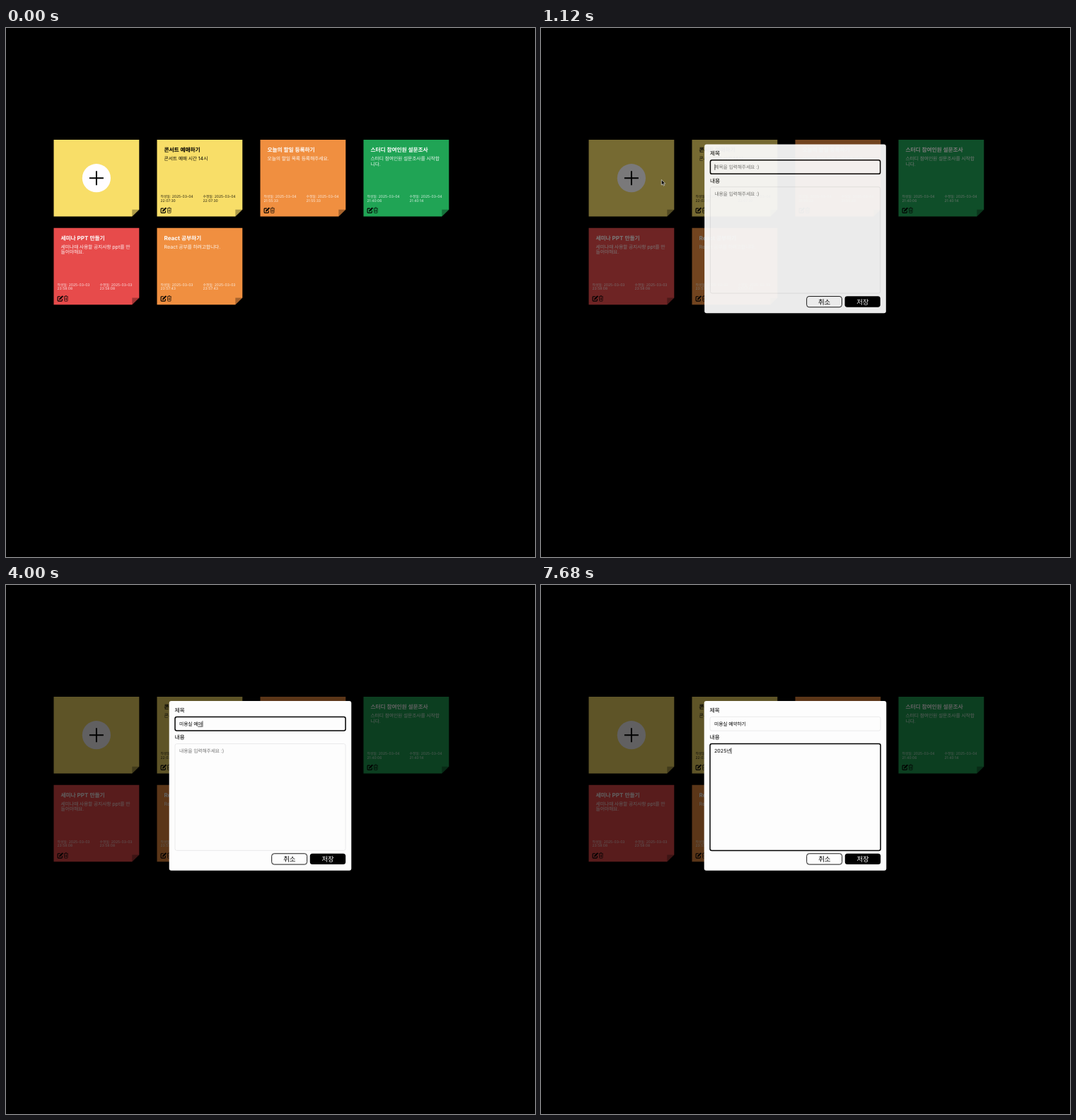
An HTML page for the animation above (8 s loop, 748 by 748 pixels).

```html
<!DOCTYPE html>
<html lang="ko">
<head>
<meta charset="utf-8">
<title>Memo board</title>
<style>
html, body { margin: 0; width: 100%; height: 100%; overflow: hidden; background: #000; }
svg { display: block; width: 748px; height: 748px; }
text { white-space: pre; text-rendering: geometricPrecision; }
.ko { font-family: "Noto Sans CJK KR", "Noto Sans CJK", sans-serif; }
.en { font-family: Inter, "Noto Sans", sans-serif; }
</style>
</head>
<body>
<svg id="stage" viewBox="0 0 748 748" xmlns="http://www.w3.org/2000/svg"></svg>
<script>
const LOOP = 8000;
const INK = '#000', WHITE = '#fdfdfd', HINT = '#757575';

// Hangul and Latin runs get their own font, size and spacing.
const runs = (str, em) => str.replace(/[ -~]*[!-~]|[^!-~]+/g, run => /[!-~]/.test(run)
  ? `<tspan class="en" font-size="${em}">${run}</tspan>`
  : `<tspan class="ko" font-size="${em * .963}" letter-spacing="${em * -.021}">${run}</tspan>`);

const text = (str, x, y, em, fill, extra = '') =>
  `<text x="${x}" y="${y}" fill="${fill}" ${extra}>${runs(str, em)}</text>`;

const box = (x, y, w, h, r, fill, extra = '') =>
  `<rect x="${x}" y="${y}" width="${w}" height="${h}" rx="${r}" fill="${fill}" ${extra}/>`;

const sheet = (x, y, fill, inner) => `<g transform="translate(${x} ${y})">
  <path d="M0 0H120.8V98.8L110.8 108.6H0Z" fill="${fill}"/>
  <path d="M110.8 98.8H120.8L110.8 108.6Z" fill="#000" opacity=".3"/>${inner}</g>`;

const icons = `<g transform="translate(5 95.3)" fill="none" stroke="#000">
  <path d="M4.3 1.8H1.5Q.6 1.8 .6 2.7V7.2Q.6 8.1 1.5 8.1H6Q6.9 8.1 6.9 7.2V5" stroke-width="1.1"/>
  <path d="M2.5 6.4L2.9 4.5L6.7 .7Q7.2 .2 7.7 .7L8.1 1.1Q8.6 1.6 8.1 2.1L4.4 5.9Z" fill="#000" stroke="none"/>
  <path d="M9.2 1.8H15.4M11 1.6L11.5 .6H13.1L13.6 1.6M9.9 2L10.1 7.6Q10.1 8.3 10.8 8.3H13.8Q14.5 8.3 14.5 7.6L14.7 2M11.5 3.6V6.7M13.1 3.6V6.7" stroke-width=".65"/>
</g>`;

const stamp = (label, x, date, time, fill) =>
  text(`${label}: ${date}`, x, 81.9, 5.1, fill, 'opacity=".85"') +
  text(time, x, 87.6, 5.1, fill, 'opacity=".85"');

function note([col, row, fill, ink, title, lines, date, made, edited]) {
  return sheet(67.5 + 146 * col, 158 + 124.7 * row, fill,
    text(title, 10, 17.4, 8.1, ink, 'font-weight="700"') +
    lines.map((s, i) => text(s, 10, 28.9 + 7.9 * i, 7.1, ink, 'opacity=".92"')).join('') +
    stamp('작성일', 5, date, made, ink) + stamp('수정일', 65, date, edited, ink) + icons);
}

const YELLOW = '#f8de68', ORANGE = '#f08f40', GREEN = '#20a455', RED = '#e74b4b';
const notes = [
  [1, 0, YELLOW, INK, '콘서트 예매하기', ['콘서트 예매 시간 14시'], '2025-03-04', '22:07:30', '22:07:30'],
  [2, 0, ORANGE, WHITE, '오늘의 할일 등록하기', ['오늘의 할일 목록 등록해주세요.'], '2025-03-04', '21:55:33', '21:55:33'],
  [3, 0, GREEN, WHITE, '스터디 참여인원 설문조사', ['스터디 참여인원 설문조사를 시작합', '니다.'], '2025-03-04', '21:40:06', '21:40:14'],
  [0, 1, RED, WHITE, '세미나 PPT 만들기', ['세미나때 사용할 공지사항 ppt를 만', '들어야해요.'], '2025-03-03', '23:58:08', '23:58:08'],
  [1, 1, ORANGE, WHITE, 'React 공부하기', ['React 공부를 하려고합니다.'], '2025-03-03', '23:57:43', '23:57:43']
];

const addSheet = sheet(67.5, 158, YELLOW,
  '<circle cx="60.4" cy="54.2" r="20.1" fill="#fffdff"/>' +
  '<path d="M50.4 54.2H70.4M60.4 44.2V64.2" stroke="#000" stroke-width="1.9"/>');

const field = (id, y, h) => box(239, y, 241.1, h, 2.5, WHITE, `id="${id}Box"`) +
  `<text id="${id}Text" x="245" y="${y + 12.3}"></text>
   <path id="${id}Line" stroke="#000" stroke-width=".7"/>
   <path id="${id}Caret" stroke="#000" stroke-width=".7"/>`;

const dialog = `<g id="dialog">
  ${box(230.7, 164.1, 257.6, 239.6, 3, WHITE)}
  ${text('제목', 238.6, 179.9, 8.1, INK, 'font-weight="500"')}
  ${text('내용', 238.6, 218.3, 8.1, INK, 'font-weight="500"')}
  ${field('title', 186.4, 19.7)}
  ${field('body', 224.5, 150.9)}
  ${box(375.7, 379.8, 50, 15.3, 3.5, WHITE, 'stroke="#000" stroke-width=".9"')}
  ${box(429.8, 379.7, 50.4, 15.4, 3.5, INK)}
  ${text('취소', 400.7, 391.1, 9.9, INK, 'text-anchor="middle"')}
  ${text('저장', 455, 391.1, 9.9, WHITE, 'text-anchor="middle"')}
</g>`;

const pointers = `<path id="arrow" d="M0 0V7.4L1.8 5.8L3 8.5L4.3 7.9L3.1 5.3H5.4Z" fill="#000" stroke="#fff" stroke-width=".6"/>
  <path id="beam" d="M-2 -4.4Q0 -4.4 0 -3.3Q0 -4.4 2 -4.4M0 -3.3V3.3M-2 4.4Q0 4.4 0 3.3Q0 4.4 2 4.4M-1 .9H1" fill="none" stroke="#000" stroke-width=".9"/>`;

document.getElementById('stage').innerHTML = addSheet + notes.map(note).join('') +
  box(0, 0, 748, 748, 0, INK, 'id="shade"') + dialog + pointers;

const $ = id => document.getElementById(id);
const show = (el, on) => el.setAttribute('visibility', on ? 'visible' : 'hidden');

// time, shade opacity, dialog opacity
const fade = [[0, 0, 0], [1040, .22, .45], [1120, .52, .93], [1200, .62, 1]];

// time, pointer, x, y
const moves = [
  [0, ''], [80, 'arrow', 566, 228], [160, 'arrow', 300, 186], [240, 'arrow', 26, 155],
  [400, 'arrow', 180, 222], [480, 'arrow', 440, 310], [560, 'arrow', 602, 355],
  [640, 'arrow', 340, 262], [720, 'arrow', 125.5, 201], [960, 'arrow', 124.6, 198.8],
  [1120, 'arrow', 170.3, 214.6], [1200, 'beam', 286, 260.8], [1280, 'beam', 287, 262],
  [1440, 'beam', 288, 262.3], [1840, ''], [4880, 'beam', 287, 262.5], [4960, 'beam', 288, 263.2],
  [5120, 'beam', 288, 264], [5280, 'beam', 284, 264.6], [5360, 'beam', 281, 265],
  [5440, 'beam', 279, 265.2], [6480, '']
];

// time, settled text, syllable being composed
const titleKeys = [
  [0, '', ''], [2160, '', 'ㅁ'], [2240, '', '미'], [2400, '', '밍'], [2480, '미', '요'],
  [2560, '미', '용'], [2640, '미용', 'ㅅ'], [2720, '미용', '시'], [2800, '미용', '실'],
  [2960, '미용실', ''], [3040, '미용실 ', ''], [3520, '미용실 ', 'ㅇ'], [3680, '미용실 ', '예'],
  [3840, '미용실 ', '옝'], [4000, '미용실 예', '야'], [4080, '미용실 예', '약'],
  [4240, '미용실 예약', 'ㅎ'], [4320, '미용실 예약', '하'], [4400, '미용실 예약', '학'],
  [4480, '미용실 예약하', '기'], [4560, '미용실 예약하기', '']
];
const bodyKeys = [
  [0, '', ''], [6480, '2', ''], [6800, '20', ''], [6960, '202', ''], [7200, '2025', ''],
  [7360, '2025', 'ㄴ'], [7520, '2025', '녀'], [7600, '2025', '년'], [7680, '2025년', '']
];
const blink = [[0, 1], [1600, 0], [1840, 1], [5680, 0], [6160, 1]];
const FOCUS_BODY = 5040;

const at = (table, t) => table.findLast(row => row[0] <= t).slice(1);

function drawField(id, hint, [done, part], focused, caretOn) {
  const el = $(id + 'Text'), typed = done + part;
  const y = +el.getAttribute('y');
  const width = str => {
    el.innerHTML = runs(str, 7.1);
    return str ? el.getComputedTextLength() : 0;
  };
  const start = 245 + width(done), end = 245 + width(typed);
  if (!typed) el.innerHTML = runs(hint, 7.1);
  el.setAttribute('fill', typed ? INK : HINT);
  $(id + 'Line').setAttribute('d', part ? `M${start} ${y + 1.5}H${end}` : '');
  $(id + 'Caret').setAttribute('d', focused && caretOn ? `M${end + .5} ${y - 6.4}V${y + 1.9}` : '');
  const frame = $(id + 'Box');
  frame.setAttribute('stroke', focused ? INK : '#e2e2e4');
  frame.setAttribute('stroke-width', focused ? 1.5 : .7);
}

let lastStep = -1;
function draw(t) {
  const [shade, alpha] = at(fade, t);
  $('shade').setAttribute('opacity', shade);
  $('dialog').setAttribute('opacity', alpha);
  $('dialog').setAttribute('transform',
    `translate(359.5 283.9) scale(${.95 + .05 * alpha}) translate(-359.5 -283.9)`);

  const inBody = t >= FOCUS_BODY, [caretOn] = at(blink, t);
  drawField('title', '제목을 입력해주세요 :)', at(titleKeys, t), !inBody, caretOn);
  drawField('body', '내용을 입력해주세요 :)', at(bodyKeys, t), inBody, caretOn);

  const [kind, x, y] = at(moves, t);
  for (const id of ['arrow', 'beam']) show($(id), id === kind);
  if (kind) $(kind).setAttribute('transform', `translate(${x} ${y})`);
}

function tick() {
  const t = performance.now() % LOOP, step = Math.floor(t / 80);
  if (step !== lastStep) draw(step * 80);
  lastStep = step;
  requestAnimationFrame(tick);
}
tick();
</script>
</body>
</html>
```
